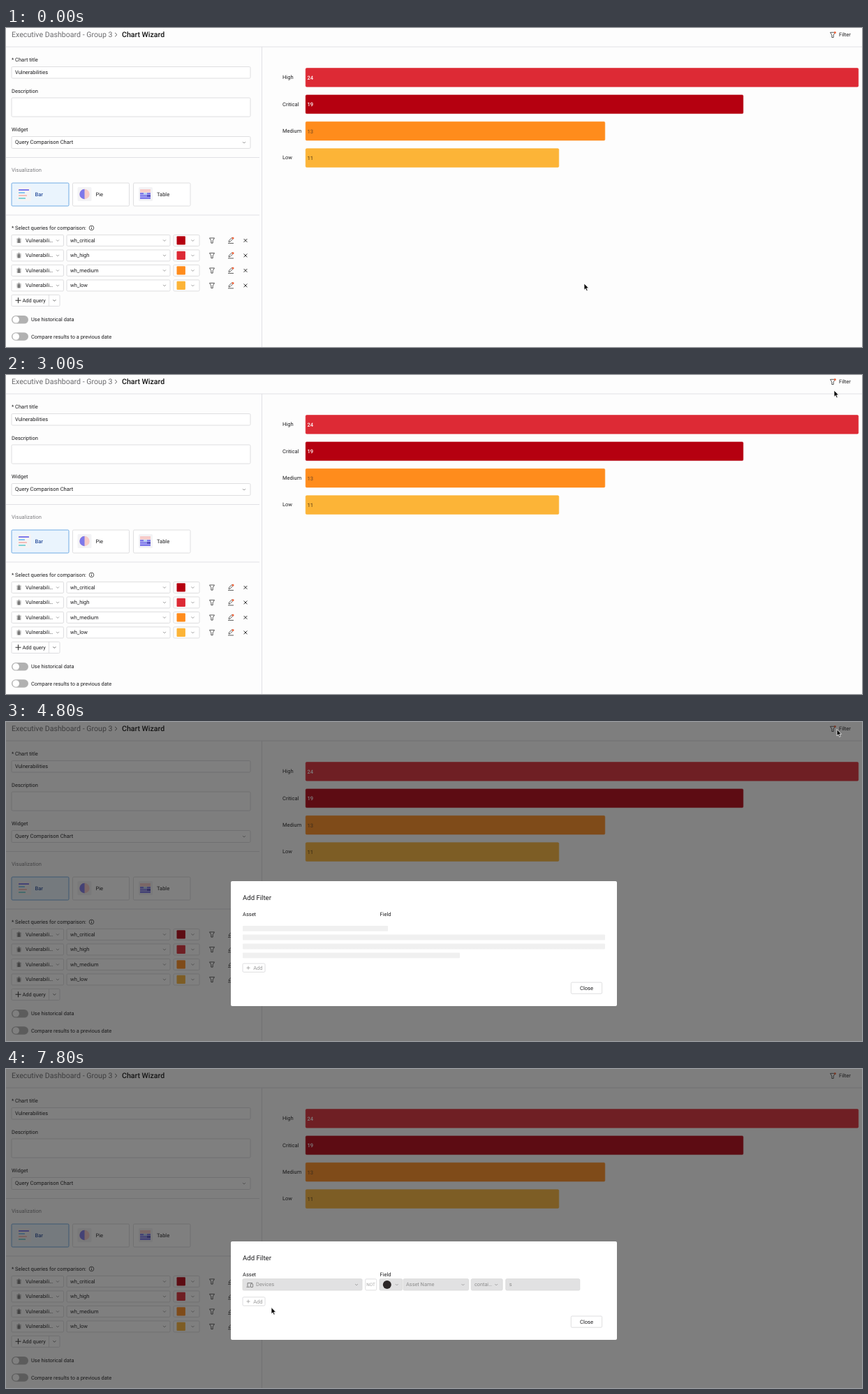
Write an HTML page that moves like this. It is 1226 px wide and 457 px high and loops after 8 s.

```html
<!DOCTYPE html>
<html lang="en">
<head>
<meta charset="utf-8">
<title>Chart Wizard</title>
<style>
  html, body { margin: 0; width: 100%; height: 100%; overflow: hidden; background: #fdfdfd; }
  svg { display: block; width: 1226px; height: 457px; }
  text { font-family: Roboto, Arial, sans-serif; text-rendering: geometricPrecision; white-space: pre; }
</style>
</head>
<body>
<svg id="stage" viewBox="0 0 1226 457" xmlns="http://www.w3.org/2000/svg">
  <defs>
    <linearGradient id="shine" gradientUnits="userSpaceOnUse" x1="0" x2="260" y1="0" y2="0">
      <stop offset="0" stop-color="#f0f0f0"/>
      <stop offset=".5" stop-color="#e4e4e4"/>
      <stop offset="1" stop-color="#f0f0f0"/>
    </linearGradient>
  </defs>
  <g id="page"></g>
  <rect id="mask" width="1226" height="457" fill="#161616" fill-opacity=".55"/>
  <g id="modal"></g>
  <path id="arrow" d="M0 0V9.3L2.1 7.4 3.6 10.8 5.2 10.1 3.7 6.8H6.6Z" fill="#000" stroke="#fff" stroke-width=".8"/>
  <g id="hand" stroke="#000" stroke-width=".8" stroke-linejoin="round">
    <path fill="#fff" d="M1.2 1Q2 -.2 2.8 1V4.4Q3.8 3.6 4.5 4.7Q5.5 4 6.1 5.1Q7.4 4.6 7.5 6V8Q7.3 9.6 6.4 10.6V11.6H2.2V10.6L-.7 7.4Q-1.5 6 -.2 5.9L1.2 7Z"/>
    <path fill="none" d="M3.2 7.4V9.6M4.7 7.4V9.6" stroke-width=".5"/>
  </g>
</svg>
<script>
const $ = id => document.getElementById(id);
const INK = '#1d1d1f', EDGE = '#d6d6d9', GREY = '#8d8d8d';
const RED = '#dd2a35', CRIMSON = '#b50010', ORANGE = '#ff8c1c', AMBER = '#fcb437';

const text = (x, y, s, o = {}) =>
  `<text x="${x}" y="${y}" font-size="${o.size || 7.5}" font-weight="${o.weight || 400}" fill="${o.fill || INK}">${s}</text>`;
const rect = (x, y, w, h, fill, o = {}) =>
  `<rect x="${x}" y="${y}" width="${w}" height="${h}" rx="${o.r ?? 1.5}" fill="${fill}" stroke="${o.edge || 'none'}" stroke-width="${o.sw || .8}"/>`;
const line = (d, color = INK, w = .8) =>
  `<path d="${d}" fill="none" stroke="${color}" stroke-width="${w}"/>`;
const box = (x, y, w, h, fill = '#fff', edge = EDGE) => rect(x, y, w, h, fill, { edge });
const chevron = (x, y, color = '#777') => line(`M${x - 2} ${y - 1}l2 2 2-2`, color, .7);

const funnel = (x, y) => line(`M${x - 3.5} ${y - 3.5}h7l-2.3 3.8v3.4h-2.4v-3.4Z`, '#333', .8);

function bug(x, y) {
  return line(`M${x - 3.4} ${y - 1.8}h6.8M${x - 3.4} ${y + .7}h6.8M${x - 3} ${y + 3}h6`, '#666', .7) +
    rect(x - 1.9, y - 2.2, 3.8, 5.8, '#777', { r: 1.8 }) +
    line(`M${x - 1.6} ${y - 2.6}q1.6-2 3.2 0`, '#666', .8);
}

function pencil(x, y) {
  return line(`M${x - 4} ${y + 4}h8`, '#333', .8) +
    line(`M${x - 3} ${y + 2}l.5-2 4.2-4.2 1.6 1.6-4.2 4.2Z`, '#333', .8) +
    `<circle cx="${x + 3}" cy="${y - 3.4}" r="1.5" fill="#f0643c"/>`;
}

function header() {
  return rect(1167, 1, 55, 17, '#d4d7e0', { r: 2 }).replace('<rect', '<rect id="hover"') +
    text(8, 13.3, 'Executive Dashboard - Group 3', { size: 10.64, fill: '#6b6b6e' }) +
    line('M156 6.8l3 2.8-3 2.8', '#555', .9) +
    text(166, 13.3, 'Chart Wizard', { size: 10.55, weight: 500, fill: '#111' }) +
    funnel(1184, 9.8) + '<circle cx="1187.3" cy="6.6" r="1.5" fill="#f0643c"/>' +
    text(1193, 12.2, 'Filter') +
    line('M0 27H1226M366.5 27V457', '#dedee2', .9);
}

function form() {
  return text(8, 47.8, '* Chart title') + box(8, 55.5, 342, 16.5) + text(13, 66.2, 'Vulnerabilities') +
    text(8, 92.5, 'Description') + box(8, 100, 342, 27) +
    text(8, 147.6, 'Widget') + box(8, 155.5, 342, 17) +
    text(13, 166.4, 'Query Comparison Chart', { size: 7.6 }) + chevron(341, 164) +
    line('M0 185.5H363M0 268H363', '#dedee2', .9) +
    text(8, 206, 'Visualization', { fill: '#7d7d80' });
}

function views() {
  const tile = x => rect(x, 228, 20, 20, '#f3f3f5');
  const bars = [[15, '#7d78ea'], [9, '#86c5ee'], [12, '#f4bdb9'], [10, '#7fd3d6']]
    .map(([w, c], i) => rect(18, 231 + i * 4, w, 1.9, c, { r: .5 })).join('');
  return box(8, 222, 82, 33, '#eaf4fd', '#4f97de') + tile(16) + bars +
    text(41.5, 240.7, 'Bar', { weight: 500, fill: '#2a4f9c' }) +
    box(95.5, 222, 81, 33) + tile(102.5) +
    '<circle cx="112.5" cy="238" r="7.2" fill="#f7cbc8"/><path d="M112.5 230.8a7.2 7.2 0 0 0 0 14.4Z" fill="#7d78ea"/>' +
    text(128.5, 240.7, 'Pie') +
    box(182.5, 222, 81.5, 33) + tile(190) +
    rect(192, 231, 15, 4.6, '#f7cbc8', { r: 0 }) + rect(192, 236, 15, 9, '#7d78ea', { r: 0 }) +
    line('M192 238.9H207M192 242H207', '#dcdcf8', .7) +
    rect(197, 236, 5, 2.6, '#b9d4f3', { r: 0 }) + rect(202, 239.2, 5, 2.6, '#4b48b8', { r: 0 }) +
    text(216, 240.7, 'Table');
}

function query([name, color], i) {
  const y = 304.4 + i * 21.5;
  return box(8, y - 8, 74.5, 16) + bug(18.5, y) + text(28, y + 2.5, 'Vulnerabili…', { size: 7.35 }) + chevron(74, y) +
    box(87, y - 8, 148, 16) + text(92, y + 2.4, name) + chevron(227, y) +
    box(240, y - 8, 37, 16) + rect(244.5, y - 6.1, 12.4, 12.2, color, { r: 1 }) + chevron(267.5, y) +
    funnel(295, y) + pencil(322, y) +
    line(`M340.6 ${y - 2.4}l4.8 4.8m0-4.8l-4.8 4.8`, '#222', .95);
}

const toggle = (y, label) => rect(8, y - 5.8, 24, 11.6, '#b1b1b1', { r: 5.8 }) +
  `<circle cx="14.2" cy="${y}" r="4.8" fill="#fff"/>` + text(36, y + 2.5, label, { size: 7.45 });

function queries() {
  const rows = [['wh_critical', CRIMSON], ['wh_high', RED], ['wh_medium', ORANGE], ['wh_low', AMBER]];
  return text(8, 288.6, '* Select queries for comparison:') +
    '<circle cx="122.5" cy="286.4" r="3.3" fill="none" stroke="#333" stroke-width=".8"/>' +
    line('M122.5 285.9v2.4M122.5 284.2v.9', '#333', .9) +
    rows.map(query).join('') +
    box(8, 382.3, 69, 16.2) + line('M61.5 382.3v16.2', EDGE) + chevron(69.4, 390.3, '#333') +
    line('M13.5 390.3h8M17.5 386.3v8', '#333', 1.1) + text(23.5, 392.9, 'Add query', { size: 7.4 }) +
    toggle(417.8, 'Use historical data') + toggle(442, 'Compare results to a previous date');
}

function chart() {
  const bars = [['High', 24, RED, '#fff'], ['Critical', 19, CRIMSON, '#fff'],
    ['Medium', 13, ORANGE, '#8b5522'], ['Low', 11, AMBER, '#75521c']];
  return bars.map(([label, n, color, ink], i) => {
    const y = 57.5 + i * 38.4;
    return text(396, y + 15.6, label) + rect(429.2, y, n * 33 - .4, 26.7, color, { edge: color, sw: .6 }) +
      text(431.5, y + 16.2, n, { fill: ink, weight: 500, size: 7.6 });
  }).join('');
}

// Modal parts use coordinates relative to its top left corner.
function modalBody(h, content, addY) {
  return rect(0, 0, 553, h, '#fff', { r: 2 }).replace('<rect', '<rect class="sheet"') +
    text(17, 26.6, 'Add Filter', { size: 9.6 }) +
    text(17, 49.8, 'Asset') + text(213.5, 49.8, 'Field') + content +
    box(17, addY, 32, 12.3) + line(`M22.5 ${addY + 6.2}h5M25 ${addY + 3.7}v5`, '#9a9a9a', .8) +
    text(32.2, addY + 8.8, 'Add', { fill: '#9a9a9a' }) +
    box(487.3, h - 34, 44.3, 16.2) + text(500, h - 23.3, 'Close', { size: 7.6 });
}

function skeleton() {
  const bones = [[64, 208], [76.6, 519], [89.6, 519], [102.5, 311]]
    .map(([y, w]) => rect(17, y, w, 7.8, 'url(#shine)', { r: 1 })).join('');
  return modalBody(179, bones, 118);
}

function filterRow() {
  const field = (x, w) => box(x, 53.7, w, 16.3, '#e1e1e2', '#d8d8d9');
  const label = (x, s, size = 7.4) => text(x, 64.1, s, { fill: GREY, size });
  const laptop = line('M24 64.6v-5h7M22.5 65.3h5', '#666', .8) +
    rect(28.4, 60.8, 3.2, 4.8, '#e1e1e2', { edge: '#666', r: .6 });
  return modalBody(141,
    field(17, 171) + laptop + label(36, 'Devices', 7.5) + chevron(180, 62, GREY) +
    box(192.7, 53.9, 16, 16) + text(194.2, 64.4, 'NOT', { size: 6.3, fill: '#a4a4a4' }) +
    field(213, 32.5) + '<circle cx="223.8" cy="61.9" r="6" fill="#2b2627"/>' + chevron(237.7, 62, GREY) +
    field(247, 93.5) + label(251, 'Asset Name') + chevron(332.5, 62, GREY) +
    field(344.3, 44.8) + label(349, 'contai…', 7.3) + chevron(380.2, 62, GREY) +
    field(393.8, 106) + label(398.7, 's'), 79.8);
}

$('page').innerHTML = header() + form() + views() + queries() + chart();
$('modal').innerHTML = `<g id="loading">${skeleton()}</g><g id="loaded">${filterRow()}</g>`;

const LOOP = 8000, STEP = 200;
const HOVER = 3600, PRESS = 4400, OPEN = 4600, FULL = 4800, READY = 5400;

// time, x, y of the pointer tip
const path = [
  [0, 828, 366], [200, 836, 358], [400, 884, 312], [600, 965, 232], [800, 1050, 150],
  [1000, 1120, 88], [1200, 1158, 48], [1400, 1174, 32], [1600, 1181, 27], [2200, 1184, 25],
  [2600, 1184, 24], [3000, 1186, 22], [3400, 1188, 19], [3600, 1189, 14], [4000, 1190, 10.5],
  [5000, 1190, 10.5], [5200, 1187, 15], [5400, 1176, 32], [5600, 1150, 68], [5800, 1108, 122],
  [6000, 1060, 180], [6200, 1012, 230], [6400, 965.5, 266], [6600, 870, 292], [6800, 740, 312],
  [7000, 600, 326], [7200, 490, 335], [7400, 420, 340], [7600, 388, 341], [7800, 380, 341.5]
];

function pointer(t) {
  const i = path.findIndex(p => p[0] > t);
  if (i < 0) return path[path.length - 1].slice(1);
  const [t0, x0, y0] = path[i - 1], [t1, x1, y1] = path[i];
  const k = (t - t0) / (t1 - t0);
  return [x0 + (x1 - x0) * k, y0 + (y1 - y0) * k];
}

const show = (id, on) => $(id).setAttribute('visibility', on ? 'visible' : 'hidden');
const set = (id, name, value) => $(id).setAttribute(name, value);
const sheet = document.querySelector('#loading .sheet');

function draw() {
  const t = Math.floor(performance.now() % LOOP / STEP) * STEP;
  const [x, y] = pointer(t);
  const overButton = t >= HOVER && t < OPEN;
  const zooming = t >= OPEN && t < FULL;

  set('arrow', 'transform', `translate(${x} ${y})`);
  set('hand', 'transform', `translate(${x} ${y})`);
  show('arrow', !overButton);
  show('hand', overButton);

  show('hover', overButton || zooming);
  set('hover', 'fill', t >= PRESS ? '#d4d7e0' : '#e4e6ec');
  set('hover', 'opacity', zooming ? .35 : 1);

  show('mask', t >= OPEN);
  show('loading', t >= OPEN && t < READY);
  show('loaded', t >= READY);
  set('loaded', 'transform', 'translate(322 247)');
  set('loading', 'transform', zooming ? 'translate(494 283.6) scale(.376)' : 'translate(322 228)');
  set('loading', 'opacity', zooming ? .55 : 1);
  sheet.setAttribute('fill', zooming ? '#c2d8bb' : '#fff');
  set('shine', 'gradientTransform', `translate(${-260 + Math.max(0, t - FULL) * .7} 0)`);

  requestAnimationFrame(draw);
}
draw();
</script>
</body>
</html>
```
